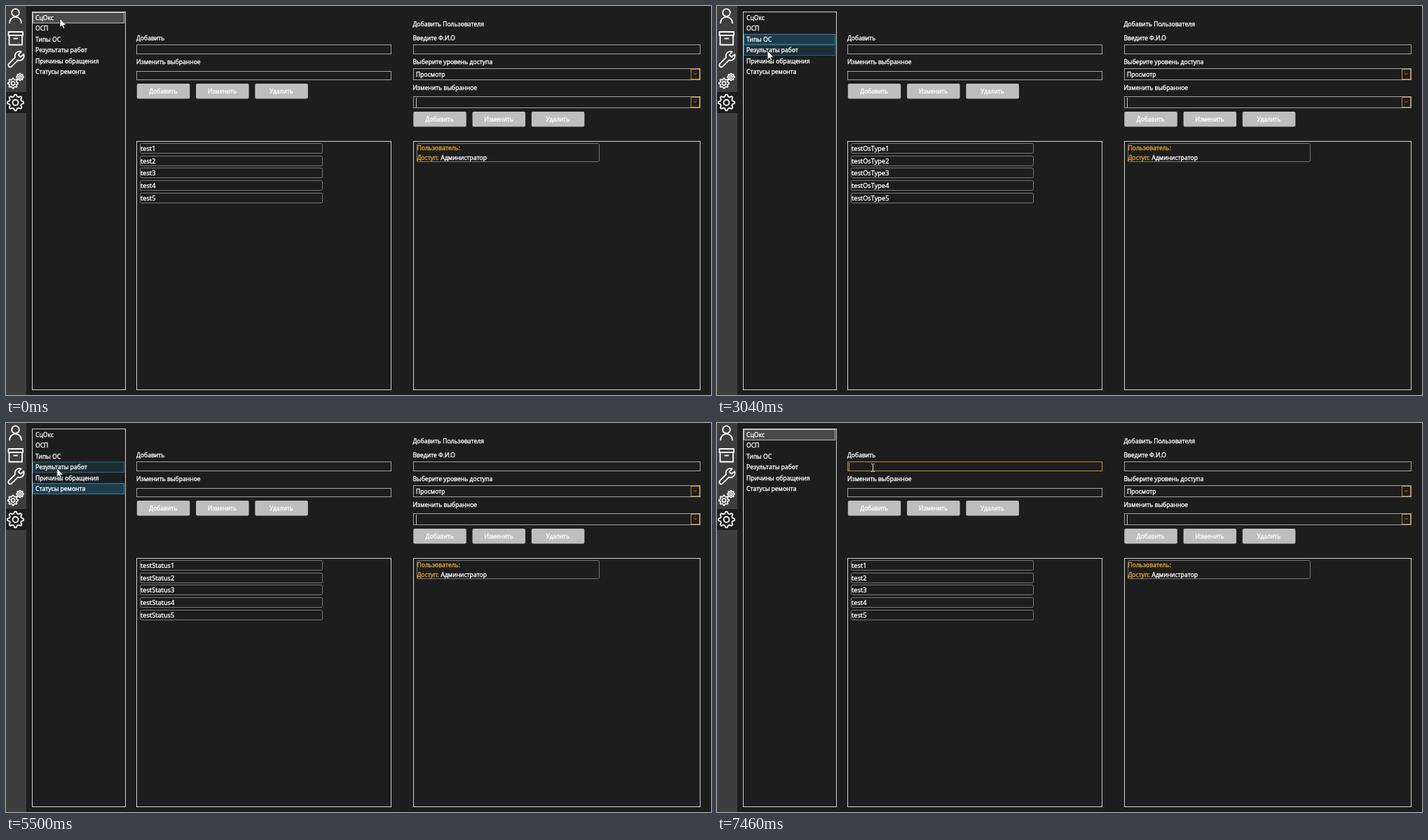
Recreate the animation shown at these times as an HTML page with a canvas. Size 1006 by 556 pixels, loop 8 s.

```html
<!DOCTYPE html>
<html lang="ru">
<head>
<meta charset="utf-8">
<title>Настройки</title>
<style>
  html, body { margin: 0; width: 100%; height: 100%; overflow: hidden; background: #1d1d1d; }
  canvas { display: block; width: 1006px; height: 556px; }
</style>
</head>
<body>
<canvas id="stage" width="1006" height="556"></canvas>
<script>
const ctx = document.getElementById('stage').getContext('2d');
const LOOP = 8000;
const BG = '#1d1d1d', LINE = '#c4c4c4', ORANGE = '#e8a42c';
const FONT = '"Open Sans", "Noto Sans", sans-serif';
const HAIR = 0.8;
const ITEM_TOP = 9.2, ITEM_STEP = 15.4;

const menu = ['СцОкс', 'ОСП', 'Типы ОС', 'Результаты работ', 'Причины обращения', 'Статусы ремонта'];
const prefixes = ['test', 'testOsp', 'testOsType', 'testWorkResult', 'testReason', 'testStatus'];
const clicks = [[0, 0], [1730, 1], [2680, 2], [3530, 3], [4400, 4], [5210, 5], [6190, 0]];
const LIST_FOCUS = 1730, FIELD_FOCUS = 7460;

const smooth = p => p * p * (3 - 2 * p);
const easeIn = p => p * p * (2 - p);
const easeOut = p => 1 - (1 - p) ** 2;

// Pointer moves: start, end, target x, target y, easing
const start = [77, 18];
const moves = [
  [755, 980, 76, 32, smooth],
  [1940, 2280, 73, 46.5, smooth],
  [2800, 3040, 72, 64, smooth],
  [3755, 3940, 73, 78.5, smooth],
  [4400, 4650, 75, 95.5, smooth],
  [5190, 5910, 69, 18.5, smooth],
  [6345, 6780, 184, 78.5, easeIn],
  [6780, 7150, 222, 65, easeOut],
  [7160, 7210, 222, 63.5, smooth]
];

function pointerAt(t) {
  let [x, y] = start;
  for (const [from, to, tx, ty, ease] of moves) {
    if (t < from) break;
    const p = ease(Math.min(1, (t - from) / (to - from)));
    x += (tx - x) * p;
    y += (ty - y) * p;
  }
  return { x, y };
}

// A thin outline gives the small glyphs their screen weight
function text(str, x, cy, color = '#fff', size = 8.6, align = 'left') {
  ctx.font = `${size}px ${FONT}`;
  ctx.textAlign = align;
  ctx.fillStyle = ctx.strokeStyle = color;
  ctx.lineWidth = 0.35;
  ctx.fillText(str, x, cy + 3);
  ctx.strokeText(str, x, cy + 3);
}

function fill(x, y, w, h, color) {
  ctx.fillStyle = color;
  ctx.fillRect(x, y, w, h);
}

function frame(x, y, w, h, color = '#fff') {
  ctx.strokeStyle = color;
  ctx.lineWidth = HAIR;
  ctx.strokeRect(x + HAIR / 2, y + HAIR / 2, w - HAIR, h - HAIR);
}

function rounded(x, y, w, h, r) {
  ctx.beginPath();
  ctx.roundRect(x, y, w, h, r);
}

function roundFrame(x, y, w, h) {
  rounded(x + 0.5, y + 0.5, w - 1, h - 1, 2);
  ctx.strokeStyle = '#777';
  ctx.lineWidth = 1;
  ctx.stroke();
}

function polyline(points, closed) {
  ctx.beginPath();
  points.forEach(([x, y]) => ctx.lineTo(x, y));
  if (closed) ctx.closePath();
}

function buttons(x, y) {
  ['Добавить', 'Изменить', 'Удалить'].forEach((label, i) => {
    const left = x + i * 84.3;
    rounded(left, y, 75.5, 21.5, 2);
    ctx.fillStyle = '#bebebe';
    ctx.fill();
    text(label, left + 37.5, y + 11, '#fff', 8.5, 'center');
  });
}

function combo(y, h) {
  frame(581, y, 410, h, LINE);
  frame(977, y + 1, 13, h - 2, ORANGE);
  polyline([[981.5, y + 7], [983.5, y + 9], [985.5, y + 7]]);
  ctx.stroke();
}

function gear(cx, cy, r, teeth, hole) {
  const points = [];
  for (let i = 0; i < teeth * 4; i++) {
    const a = (i - 0.5) * Math.PI / (teeth * 2) - Math.PI / 2;
    const d = i % 4 < 2 ? r : r * 0.76;
    points.push([cx + d * Math.cos(a), cy + d * Math.sin(a)]);
  }
  polyline(points, true);
  ctx.moveTo(cx + hole, cy);
  ctx.arc(cx, cy, hole, 0, Math.PI * 2);
  ctx.stroke();
}

function wrench(cx, cy) {
  ctx.save();
  ctx.translate(cx, cy);
  ctx.rotate(-Math.PI / 4);
  ctx.beginPath();
  ctx.arc(-10.5, 0, 2.8, Math.PI / 2, Math.PI * 1.5);
  ctx.lineTo(2, -2.8);
  ctx.arc(8, 0, 6.5, -2.7, -0.4);
  ctx.lineTo(8, -2.2);
  ctx.lineTo(8, 2.2);
  ctx.arc(8, 0, 6.5, 0.4, 2.7);
  ctx.lineTo(2, 2.8);
  ctx.closePath();
  ctx.stroke();
  ctx.restore();
}

function sidebar() {
  fill(0, 0, 29, 556, '#3e3e3e');
  fill(0, 123, 29, 30, BG);
  ctx.strokeStyle = '#fff';
  ctx.lineWidth = 1.8;
  ctx.lineJoin = 'round';
  ctx.beginPath();
  ctx.arc(13.5, 9.5, 5.3, 0, Math.PI * 2);
  ctx.moveTo(5, 25);
  ctx.bezierCurveTo(5, 12.5, 22, 12.5, 22, 25);
  ctx.stroke();
  ctx.strokeRect(3.5, 37, 20.5, 5);
  ctx.strokeRect(4.5, 42, 18.5, 13.5);
  polyline([[10.5, 46.5], [17, 46.5]]);
  ctx.stroke();
  wrench(13.5, 77);
  ctx.lineWidth = 1.6;
  gear(10, 110.5, 7.2, 8, 2.6);
  gear(20, 101.5, 5, 8, 1.7);
  ctx.lineWidth = 1.8;
  gear(13.5, 138, 11.5, 8, 4);
  ctx.lineJoin = 'miter';
}

function menuList(selected, hovered, active) {
  frame(37, 8, 134, 541);
  menu.forEach((label, i) => {
    const y = ITEM_TOP + ITEM_STEP * i;
    let look;
    if (i === selected) look = active ? ['#26a0da3d', '#26a0da'] : ['#dadada3d', '#dadada'];
    else if (i === hovered) look = ['#26a0da1f', '#26a0daa8'];
    if (look) {
      fill(38.2, y, 130.8, ITEM_STEP, look[0]);
      frame(38.2, y, 130.8, ITEM_STEP, look[1]);
    }
    text(label, 42, 17 + ITEM_STEP * i);
  });
}

function middle(prefix, hot, focused) {
  text('Добавить', 186, 45.5);
  frame(186, 55, 364, 14, hot ? ORANGE : LINE);
  if (focused) fill(188, 57, 1, 11, ORANGE);
  text('Изменить выбранное', 186, 79.5);
  frame(186, 93, 364, 13, LINE);
  buttons(186.8, 111);
  frame(186, 193, 364, 356);
  for (let i = 0; i < 5; i++) {
    const y = Math.round(195.9 + i * 17.75);
    roundFrame(191, y, 261, 15);
    text(prefix + (i + 1), 192, y + 8, '#fff', 9.25);
  }
}

function right() {
  text('Добавить Пользователя', 580.5, 26);
  text('Введите Ф.И.О', 580.5, 45.5);
  frame(581, 55, 410, 14, LINE);
  text('Выберите уровень доступа', 580.5, 79.5);
  combo(89, 17);
  text('Просмотр', 585, 98);
  text('Изменить выбранное', 580.5, 116.5);
  combo(129, 17);
  fill(585, 131, 1, 14, LINE);
  buttons(581.3, 151);
  frame(581, 193, 410, 356);
  roundFrame(586, 196, 261, 27);
  text('Пользователь:', 586.5, 203, ORANGE);
  text('Доступ:', 586.5, 217, ORANGE);
  text('Администратор', 620.5, 217);
}

function arrow(x, y) {
  ctx.save();
  ctx.translate(x, y);
  polyline([[0, 0], [0, 12.5], [2.9, 9.8], [4.9, 14.3], [6.8, 13.5], [4.9, 9.2], [8.8, 9.2]], true);
  ctx.fillStyle = '#fff';
  ctx.fill();
  ctx.strokeStyle = '#000';
  ctx.lineWidth = 0.6;
  ctx.stroke();
  ctx.restore();
}

function beam(x, y) {
  x = Math.round(x);
  y = Math.round(y);
  fill(x, y - 5, 1, 10, '#ddd');
  for (const dy of [-6, 5]) {
    fill(x - 2, y + dy, 2, 1, '#ddd');
    fill(x + 1, y + dy, 2, 1, '#ddd');
  }
}

function draw(t) {
  const { x, y } = pointerAt(t);
  const selected = clicks.filter(([at]) => t >= at).pop()[1];
  const overMenu = x >= 38 && x < 170;
  const hovered = overMenu ? Math.floor((y - ITEM_TOP) / ITEM_STEP) : -1;
  const overField = x >= 186 && y >= 55 && y <= 69;

  fill(0, 0, 1006, 556, BG);
  sidebar();
  menuList(selected, hovered, t >= LIST_FOCUS && t < FIELD_FOCUS);
  middle(prefixes[selected], overField, t >= FIELD_FOCUS);
  right();
  (overField ? beam : arrow)(x, y);
}

function tick() {
  draw(performance.now() % LOOP);
  requestAnimationFrame(tick);
}
tick();
</script>
</body>
</html>
```
